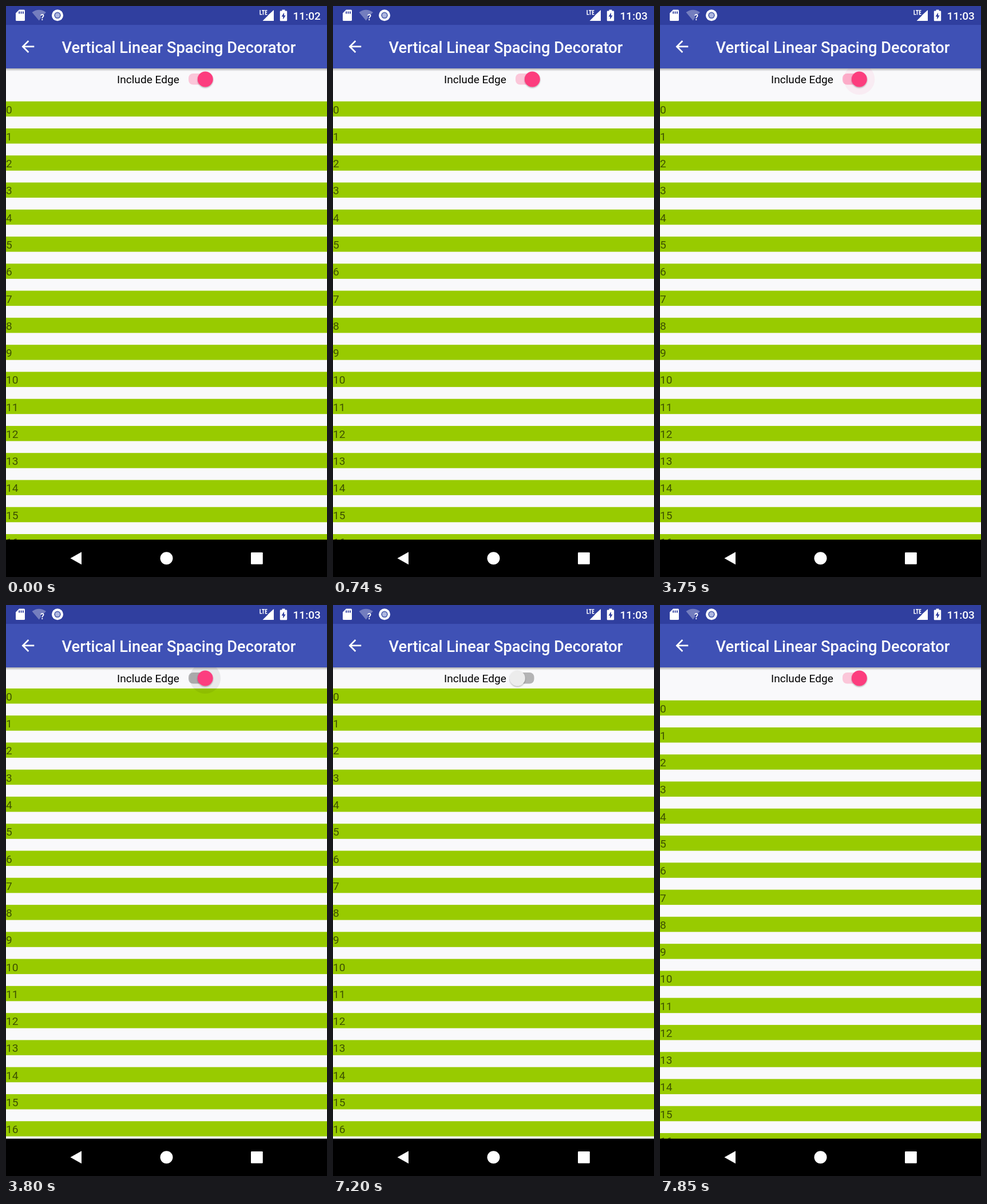
Recreate the animation shown at these times as an HTML page. Size 561x998 px, loop 9.07 s.

```html
<!DOCTYPE html>
<html lang="en">
<head>
<meta charset="utf-8">
<title>Vertical Linear Spacing Decorator</title>
<style>
  html, body { margin: 0; width: 100%; height: 100%; overflow: hidden; background: #f9f9fb; }
  svg { display: block; width: 561px; height: 998px; }
  text { font: 19.1px Roboto, sans-serif; }
  .medium { font-weight: 500; fill: #fff; }
  .title { font-size: 27.27px; }
  #rows rect { fill: #98cb00; }
  #rows text { fill: #000; fill-opacity: .6; }
</style>
</head>
<body>
<svg viewBox="0 0 561 998">
  <defs>
    <linearGradient id="shade" x2="0" y2="1">
      <stop stop-color="#000" stop-opacity=".3"/>
      <stop offset="1" stop-color="#000" stop-opacity="0"/>
    </linearGradient>
    <filter id="lift" x="-30%" y="-30%" width="160%" height="160%">
      <feDropShadow dx="0" dy="1.3" stdDeviation="1.2" flood-opacity=".35"/>
    </filter>
  </defs>
  <rect width="561" height="998" fill="#f9f9fb"/>
  <g id="rows"></g>

  <text x="194" y="135">Include Edge</text>
  <rect id="track" x="319" y="118" width="32.5" height="19.5" rx="8"/>
  <circle id="ripple" cy="128"/>
  <circle id="thumb" cy="128" r="13.5" filter="url(#lift)"/>

  <rect y="109" width="561" height="5" fill="url(#shade)"/>
  <rect y="33" width="561" height="76" fill="#3f51b5"/>
  <rect width="561" height="33" fill="#303f9f"/>
  <path transform="translate(22 54.6) scale(1.364)" fill="#fff"
        d="M20 11H7.83l5.59-5.59L12 4l-8 8 8 8 1.41-1.41L7.83 13H20z"/>
  <text class="medium title" x="97.5" y="81.5">Vertical Linear Spacing Decorator</text>

  <!-- status icons -->
  <g fill="#fff">
    <path fill-rule="evenodd" d="M23 6.500H31.500Q33 6.500 33 8V24.500Q33 26 31.500 26H18.500Q17 26 17 24.500V12.500ZM22.200 9.500v4h1.900v-4zM25.600 9.500v4h1.900v-4zM29 9.500v4h1.900v-4z"/>
    <path opacity=".33" d="M45.500 11Q57.500 2.500 70 11L66.500 14.500H61V21L57.700 25.500Z"/>
    <text class="medium" x="60" y="24.500" style="font-size:14px;font-weight:700">?</text>
    <circle cx="90" cy="16.300" r="10"/>
    <circle cx="90" cy="16.300" r="5.800" fill="#5365b0"/>
    <circle cx="90" cy="16.300" r="4" fill="#aeb7df"/>
    <path d="M444.200 7v7.800h3.200M447 7.700h5M449.500 7.700v7.700M456.500 7.700h-3v7h3M453.500 11h2.600" fill="none" stroke="#fff" stroke-width="1.500"/>
    <path d="M468 7V26H448.500L458 16.500V16Z"/>
    <path fill-rule="evenodd" d="M482.500 8.500V6.500h5v2H490q1.200 0 1.200 1.200V25q0 1.200-1.200 1.200H480q-1.200 0-1.200-1.200V9.700q0-1.200 1.200-1.200ZM486 11.500l-4.500 7h2.700v5l4.500-7h-2.700z"/>
  </g>
  <text id="clock" class="medium" x="501.500" y="24"></text>

  <!-- navigation bar -->
  <rect y="932.7" width="561" height="65.300" fill="#000"/>
  <g fill="#fff">
    <path d="M112.500 965.300L132 954.300V976.300Z"/>
    <circle cx="280.500" cy="965.300" r="11"/>
    <rect x="428" y="955" width="20.800" height="20.800" rx="1.200"/>
  </g>
</svg>
<script>
const LOOP = 9070, PITCH = 47.27, GAP = 20.8;
const taps = [
  { press: 3440, release: 3790, on: false },
  { press: 7200, release: 7450, on: true }
];
const $ = id => document.getElementById(id);
const clamp = v => Math.min(1, Math.max(0, v));
const mix = (a, b, k) => a + (b - a) * k;
const smooth = k => (1 - Math.cos(Math.PI * k)) / 2;
const OFF = [236, 236, 236], ON = [252, 60, 126];

let rows = '';
for (let i = 0; i < 17; i++) {
  const y = i * PITCH;
  rows += `<rect y="${y}" width="561" height="26.5"/><text y="${y + 21}">${i}</text>`;
}
$('rows').innerHTML = rows;

function setAttrs(id, attrs) {
  for (const name in attrs) $(id).setAttribute(name, attrs[name]);
}

function draw(t) {
  const [first, second] = taps;
  const checked = t < first.release || t >= second.release;
  const tap = t < second.press ? first : second;
  const slide = smooth(clamp((t - tap.release) / 250));
  const position = tap.on ? slide : 1 - slide;
  const grow = clamp((t - tap.press - 80) / 230);
  const glow = grow * (1 - clamp((t - tap.release) / 390));
  const x = mix(322.3, 348.3, position);
  const color = OFF.map((c, i) => Math.round(mix(c, ON[i], position)));

  $('clock').textContent = t < 40 ? '11:02' : '11:03';
  setAttrs('rows', { transform: `translate(0 ${145.9 + (checked ? GAP : 0)})` });
  setAttrs('track', {
    fill: checked ? '#ff4081' : '#000',
    opacity: checked ? 0.28 + 0.1 * glow : 0.28
  });
  setAttrs('thumb', { cx: x, fill: `rgb(${color})` });
  setAttrs('ripple', {
    cx: x, r: mix(13, 27, grow),
    fill: checked ? '#ff4081' : '#000', opacity: 0.065 * glow
  });
}

const start = performance.now();
function frame() {
  draw((performance.now() - start) % LOOP);
  requestAnimationFrame(frame);
}
frame();
</script>
</body>
</html>
```
